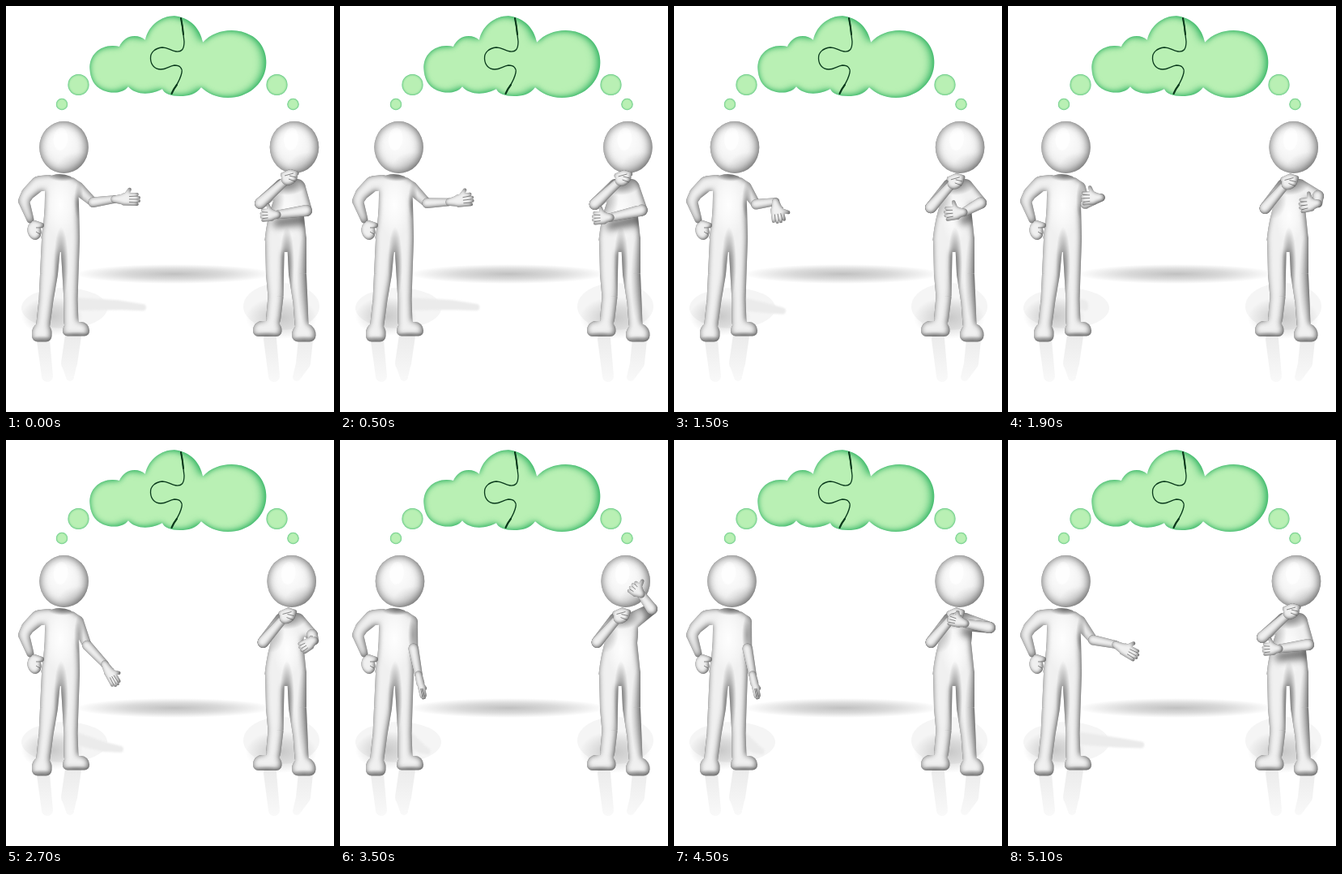
Recreate the animation shown at these times as an HTML page with a canvas. Size 405 by 500 pixels, loop 5200 ms.

```html
<!DOCTYPE html>
<html lang="en">
<head>
<meta charset="utf-8">
<title>Two figures sharing one idea</title>
<style>
  html, body { margin: 0; width: 100%; height: 100%; overflow: hidden; background: #fff; }
  canvas { display: block; }
</style>
</head>
<body>
<canvas id="stage" width="405" height="500"></canvas>
<script>
const W = 405, H = 500, LOOP = 5200, STEP = 100;
const ctx = document.getElementById('stage').getContext('2d');

function buffer() {
  const c = document.createElement('canvas');
  c.width = W;
  c.height = H;
  return c.getContext('2d');
}
const solid = buffer(), inverse = buffer(), backdrop = buffer();

// Key poses; aim is the direction of the fingers, reach their distance from the wrist.
const talking = [
  { at: 0, wrist: [134, 238], aim: 0, reach: 31, spread: 1 },
  { at: 1100, wrist: [136, 246], aim: -0.3, reach: 28, spread: 1.1 },
  { at: 1900, wrist: [115, 236], aim: 3.1, reach: 24, spread: 1.1 },
  { at: 2700, wrist: [122, 276], aim: 1.05, reach: 30, spread: 0.8 },
  { at: 3500, wrist: [97, 289], aim: 1.35, reach: 30, spread: 0.35 },
  { at: 4500, wrist: [97, 289], aim: 1.35, reach: 30, spread: 0.35 },
  { at: 5100, wrist: [133, 252], aim: 0.5, reach: 31, spread: 1 }
];
const crossed = { elbow: [371, 252], wrist: [335, 257], aim: 3.1, reach: 20, spread: 1 };
const pondering = [
  { ...crossed, at: 0 },
  { at: 1100, elbow: [375, 251], wrist: [333, 265], aim: 3.1, reach: 24, spread: 1.1 },
  { at: 1900, elbow: [383, 234], wrist: [383, 243], aim: 3, reach: 23, spread: 1.2 },
  { at: 2700, elbow: [378, 240], wrist: [381, 247], aim: 2.6, reach: 20, spread: 1 },
  { at: 3500, elbow: [385, 208], wrist: [372, 190], aim: 3.85, reach: 16, spread: 1.1 },
  { at: 4500, elbow: [390, 231], wrist: [360, 226], aim: 3.4, reach: 22, spread: 0.9 },
  { ...crossed, at: 5100 }
];

const ease = u => {
  const k = Math.min(1, Math.max(0, u));
  return k * k * (3 - 2 * k);
};
const mix = (a, b, k) => Array.isArray(a) ? a.map((v, i) => mix(v, b[i], k)) : a + (b - a) * k;
const bump = (t, centre, width) => ease(1 - Math.abs(t - centre) / width);

function poseAt(poses, t) {
  const next = poses.findIndex(p => p.at > t);
  if (next < 0) return poses[poses.length - 1];
  const a = poses[next - 1], b = poses[next], k = ease((t - a.at) / (b.at - a.at));
  return Object.fromEntries(Object.keys(a).map(key => [key, mix(a[key], b[key], k)]));
}

// Elbow of two equal bones, its bend flattened by the view.
function bendElbow([sx, sy], [wx, wy], bone = 33) {
  const dx = wx - sx, dy = wy - sy, d = Math.hypot(dx, dy) || 1;
  const bend = 0.5 * Math.sqrt(Math.max(0, bone * bone - d * d / 4));
  return [(sx + wx) / 2 - dy / d * bend, (sy + wy) / 2 + dx / d * bend];
}

// A chain of tapered capsules through [x, y, radius] joints.
function limb(...joints) {
  const p = new Path2D();
  joints.forEach(([x, y, r], i) => {
    p.moveTo(x + r, y);
    p.arc(x, y, r, 0, 7);
    if (!i) return;
    const [px, py, pr] = joints[i - 1];
    const len = Math.hypot(x - px, y - py) || 1;
    const nx = (y - py) / len, ny = (px - x) / len;
    p.moveTo(px + nx * pr, py + ny * pr);
    p.lineTo(x + nx * r, y + ny * r);
    p.lineTo(x - nx * r, y - ny * r);
    p.lineTo(px - nx * pr, py - ny * pr);
    p.closePath();
  });
  return p;
}

function oval(x, y, rx, ry, angle = 0) {
  const p = new Path2D();
  p.ellipse(x, y, rx, ry, angle, 0, Math.PI * 2);
  return p;
}

function shoe(left, right, top, bottom) {
  const p = new Path2D(), h = bottom - top;
  p.roundRect(left, top, right - left, h, [h * 0.6, h * 0.6, h * 0.35, h * 0.35]);
  return p;
}

function glow(c, x, y, rx, ry, rgb, alpha) {
  c.save();
  c.translate(x, y);
  c.scale(rx, ry);
  const g = c.createRadialGradient(0, 0, 0, 0, 0, 1);
  g.addColorStop(0, `rgba(${rgb},${alpha})`);
  g.addColorStop(0.5, `rgba(${rgb},${alpha * 0.6})`);
  g.addColorStop(1, `rgba(${rgb},0)`);
  c.fillStyle = g;
  c.fillRect(-1, -1, 2, 2);
  c.restore();
}
const WHITE = '255,255,255', GREY = '85,85,85';

// Draws the union of paths as one rounded solid, darker towards its rim.
function mould(target, paths, { base = '#f0f0f0', rim = '#505050', soft = 3.5, dx = -1.2, dy = -0.8, inside } = {}) {
  solid.globalCompositeOperation = 'source-over';
  solid.clearRect(0, 0, W, H);
  solid.fillStyle = base;
  paths.forEach(p => solid.fill(p));

  inverse.globalCompositeOperation = 'source-over';
  inverse.fillStyle = rim;
  inverse.fillRect(0, 0, W, H);
  inverse.globalCompositeOperation = 'destination-out';
  inverse.drawImage(solid.canvas, 0, 0);

  solid.globalCompositeOperation = 'source-atop';
  if (inside) inside(solid);
  solid.filter = `blur(${soft}px)`;
  solid.drawImage(inverse.canvas, dx, dy);
  solid.filter = 'blur(0.7px)';
  solid.drawImage(inverse.canvas, 0, 0);
  solid.filter = 'none';
  target.drawImage(solid.canvas, 0, 0);
}

function creases(lines) {
  ctx.strokeStyle = 'rgba(70,70,70,.7)';
  ctx.lineWidth = 0.9;
  ctx.beginPath();
  lines.forEach(([x1, y1, x2, y2]) => {
    ctx.moveTo(x1, y1);
    ctx.lineTo(x2, y2);
  });
  ctx.stroke();
}

function hand({ wrist: [x, y], aim, reach, spread }) {
  const ux = Math.cos(aim), uy = Math.sin(aim);
  const at = (along, across) => [
    x + ux * reach * along - uy * across * spread,
    y + uy * reach * along + ux * across * spread
  ];
  const palm = at(0.36, 0);
  const tipX = x + ux * reach * 0.6 + Math.abs(uy) * 12 * spread;
  const tipY = y + uy * reach * 0.6 - Math.abs(ux) * 12 * spread;
  const parts = [
    limb([x, y, 4.5], [...palm, 4 + 2.8 * spread]),
    limb([...palm, 3.2], [tipX, tipY, 2.2])
  ];
  const gaps = [];
  for (let i = -1.5; i <= 1.5; i++) {
    parts.push(limb([...at(0.36, i * 3.2), 2.6], [...at(1 - Math.abs(i) * 0.07, i * 4), 2]));
    if (i < 1) gaps.push([...at(0.58, i * 3.4 + 1.7), ...at(0.93, i * 4 + 2)]);
  }
  mould(ctx, parts, { soft: 2 });
  creases(gaps);
}

function head(x) {
  mould(ctx, [oval(x, 174, 30.3, 32)], {
    soft: 6,
    inside(c) {
      glow(c, x - 3, 166, 27, 30, WHITE, 0.9);
      glow(c, x + 18, 198, 26, 18, GREY, 0.2);
      c.fillStyle = 'rgba(255,255,255,.8)';
      c.fill(oval(x - 4, 164, 9, 14, 0.1));
    }
  });
}

const cloud = new Path2D(`M103.5 78C102 58 120 45 140 50C146 36 162 33 172 42
  C176 22 195 11 210 12.5C228 15 240 28 243 45C258 28 285 26 302 36
  C318 44 323 62 321 75C318 97 298 113 274 113C260 113 248 107 241 100
  C235 109 224 111 215 111C204 111 195 108 193 102C182 109 160 111 151 99
  C145 108 130 108 120 104C108 99 104 88 103.5 78Z`);
const seam = new Path2D(`M216 15C218 25 219 35 220 44C220 53 217 57 210 56C203 55 200 51 193 51
  C184 52 178 57 178.5 65C179 73 184 78 191 78C198 78 201 74 208 73
  C215 73 218 77 217 82C215 93 208 100 204.5 108`);
const seamEnds = new Path2D('M216 15Q218 24 219 35M211 97Q207 102 204.5 108');
const leftTorso = new Path2D(`M50 212Q64 203 80 210Q90 221 90 245L91 285
  Q90 300 68 303Q46 302 43.5 285Q48 260 48 235Z`);
const rightTorso = new Path2D(`M332 222Q345 208 360 213Q371 222 367 250L371 288
  Q370 302 346 303Q322 303 319.5 288Q322 262 330 240Z`);

function paintBackdrop() {
  const c = backdrop;
  c.fillStyle = '#fff';
  c.fillRect(0, 0, W, H);
  glow(c, 208, 330, 122, 12, '130,130,130', 0.5);
  c.fillStyle = '#f5f5f5';
  c.fill(oval(72, 372, 53, 25));
  c.fill(oval(340, 370, 47, 29));
  glow(c, 57, 382, 38, 24, GREY, 0.28);
  glow(c, 340, 384, 44, 26, GREY, 0.28);

  const fade = c.createLinearGradient(0, 408, 0, 463);
  fade.addColorStop(0, '#ececec');
  fade.addColorStop(1, '#f9f9f9');
  c.fillStyle = fade;
  c.fill(limb([46, 412, 8], [51, 456, 7]));
  c.fill(limb([83, 406, 10], [78, 440, 10], [79, 457, 5]));
  c.fill(limb([326, 410, 8], [331, 456, 7]));
  c.fill(limb([370, 411, 9], [367, 440, 9], [359, 457, 5]));

  const green = { base: '#b9f0b4', rim: '#22ad5a' };
  mould(c, [cloud], {
    ...green, soft: 3.5, dx: 0, dy: 0,
    inside(s) {
      s.filter = 'blur(5px)';
      s.globalAlpha = 0.55;
      s.drawImage(inverse.canvas, -6, 0);
      s.globalAlpha = 1;
    }
  });
  for (const x of [89.5, 334.5]) mould(c, [oval(x, 97, 13, 13)], { ...green, soft: 1.5, dx: 0, dy: 0 });
  for (const x of [69, 354.5]) mould(c, [oval(x, 121, 7.2, 7.2)], { ...green, soft: 1, dx: 0, dy: 0 });

  c.lineCap = 'round';
  c.strokeStyle = '#0a3a1c';
  c.lineWidth = 1.3;
  c.stroke(seam);
  c.lineWidth = 2.1;
  c.stroke(seamEnds);
}

function leftFigure(t) {
  const pose = poseAt(talking, t), { wrist, aim, reach } = pose;
  const shoulder = [88, 224], elbow = bendElbow(shoulder, wrist);
  const tipX = wrist[0] + Math.cos(aim) * reach, tipY = wrist[1] + Math.sin(aim) * reach;
  const shadowY = 370 + (tipY - 237) * 0.15;
  ctx.filter = 'blur(1px)';
  ctx.fillStyle = '#ebebeb';
  ctx.fill(limb([84, 367, 8], [84 + (tipX - 76) * 0.6, shadowY - 2, 6], [tipX + 4, shadowY + 1, 4]));
  ctx.filter = 'none';

  mould(ctx, [
    limb([56, 288, 12], [53, 330, 11], [49.5, 362, 9], [45.5, 395, 8.5]),
    limb([79, 288, 12], [79.5, 330, 10], [80, 362, 8.5], [80.5, 390, 9]),
    shoe(32, 56.5, 390, 413.5), shoe(70, 103, 389, 406.5),
    leftTorso,
    limb([53, 217, 9], [40, 219, 9.5], [27, 231, 8], [22, 240, 7], [30, 263, 4.5]),
    limb([80, 221, 10], [...shoulder, 8], [...elbow, 5.5])
  ], {
    inside(c) {
      glow(c, 67, 245, 20, 42, WHITE, 0.95);
      glow(c, 70, 209, 18, 7, GREY, 0.7);
      glow(c, 68, 318, 9, 46, GREY, 0.6);
      glow(c, 90, 240, 6, 24, GREY, 0.45);
      glow(c, 44, 412, 16, 6, GREY, 0.5);
      glow(c, 87, 406, 20, 5, GREY, 0.5);
    }
  });
  mould(ctx, [oval(35, 277, 8.5, 11, -0.25), limb([35, 268, 4], [44, 270, 3])], { soft: 2.2 });
  creases([[37, 273, 45, 273], [37, 278, 42, 281]]);
  mould(ctx, [limb([...elbow, 6.3], [...wrist, 4.8])], { soft: 2.5 });
  hand(pose);
  head(71.5 + 7 * bump(t, 1100, 800) + 2.5 * bump(t, 3500, 900));
}

function rightFigure(t) {
  const pose = poseAt(pondering, t), { elbow, wrist } = pose;
  // 1 while leaning into the chin hand, 0 while the other arm wanders.
  const lean = 1 - ease(t / 1900) + ease((t - 4500) / 600);
  const chinElbow = [317.5 - 3.5 * lean, 249 - 6 * lean];
  const [fx, fy] = [347.5 + 2.5 * lean, 217.5 - 5.5 * lean];
  const forearm = limb([...elbow, 7], [...wrist, 5.3]);

  mould(ctx, [
    limb([332, 288, 12], [332, 330, 11], [333, 358, 9.5], [330, 386, 9]),
    limb([359, 288, 12], [360, 330, 11], [363.5, 365, 9], [365, 392, 8.5]),
    shoe(305, 340.5, 388, 407), shoe(353, 382.5, 391, 413.5),
    rightTorso,
    limb([340, 221, 8], [...chinElbow, 7]),
    limb([359, 224, 11], [...elbow, 7])
  ], {
    inside(c) {
      glow(c, 347, 258, 17, 36, WHITE, 0.9);
      glow(c, 347, 318, 9, 46, GREY, 0.65);
      glow(c, 371, 335, 12, 60, GREY, 0.4);
      glow(c, 347, 216, 26, 17, GREY, 0.8);
      glow(c, 328, 238, 16, 24, GREY, 0.35);
      glow(c, 322, 407, 20, 6, GREY, 0.5);
      glow(c, 368, 412, 18, 6, GREY, 0.5);
      c.save();
      c.translate(0, 10);
      c.filter = 'blur(5px)';
      c.fillStyle = 'rgba(70,70,70,.75)';
      c.fill(forearm);
      c.restore();
    }
  });
  head(352.7 + 3.3 * lean);
  mould(ctx, [limb([...chinElbow, 7], [fx - 7, fy + 5, 5.3])], { soft: 2.8 });
  mould(ctx, [
    oval(fx, fy, 10.5, 8, -0.5),
    limb([fx - 8, fy - 4, 3], [fx + 1, fy - 8, 3], [fx + 9, fy - 6, 2.6])
  ], { soft: 2.2 });
  creases([[fx, fy - 3, fx + 8, fy - 1], [fx - 1, fy + 1, fx + 7, fy + 4], [fx - 6, fy - 3, fx + 5, fy - 6]]);
  mould(ctx, [forearm], { soft: 2.8 });
  hand(pose);
}

let start, shown = -1;
function tick(now) {
  start ??= now;
  const t = Math.floor((now - start) % LOOP / STEP) * STEP;
  if (t !== shown) {
    shown = t;
    ctx.drawImage(backdrop.canvas, 0, 0);
    leftFigure(t);
    rightFigure(t);
  }
  requestAnimationFrame(tick);
}

paintBackdrop();
requestAnimationFrame(tick);
</script>
</body>
</html>
```
